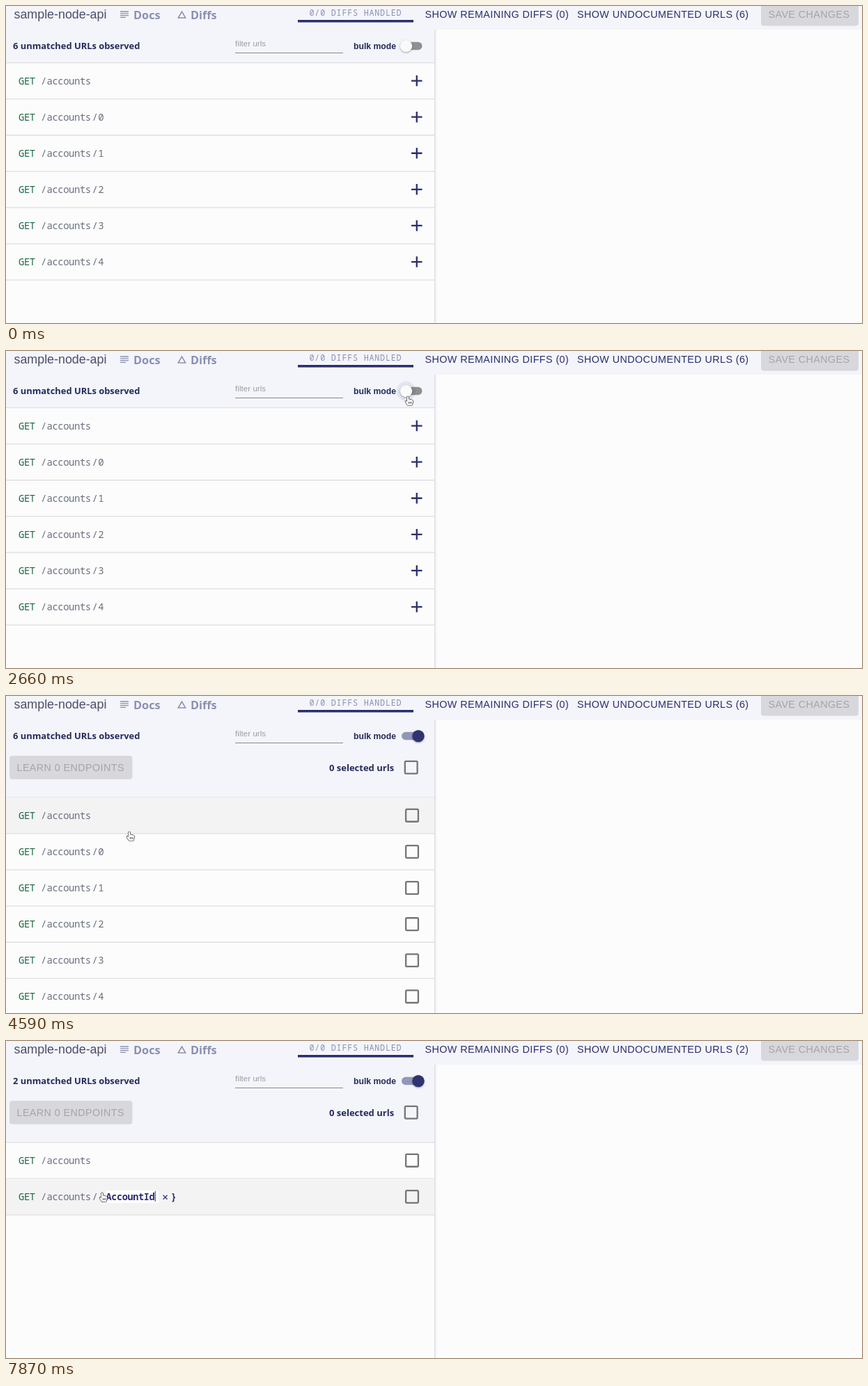
These frames come from a looping animation (1229x456 px, 8000 ms). An HTML page with a canvas:

```html
<!DOCTYPE html>
<html lang="en">
<head>
<meta charset="utf-8">
<title>URL list</title>
<style>
  html, body { margin: 0; width: 100%; height: 100%; overflow: hidden; background: #fcfcfc; }
  canvas { display: block; }
</style>
</head>
<body>
<canvas id="stage" width="1229" height="456"></canvas>
<script>
const ctx = document.getElementById('stage').getContext('2d');
const LOOP = 8000;
const NAVY = '#2b2e6e', INK = '#242a5e', LILAC = '#8b8fb3', PANEL = '#f4f5fa', PAPER = '#fcfcfc', LINE = '#dfdfe1';
const SANS = '"Liberation Sans", Arial, sans-serif';
const HUMAN = '"Noto Sans", sans-serif';
const MONO = '"Noto Sans Mono", monospace';
const ROW = 52.1, CHAR = 7.75;

// Times at which the layout changes
const PRESS = 2660, BULK = 2810, SWITCHED = 2960, NAMING = 5030, GROUPED = 5180;

// Pointer poses: time, tip x, tip y, shape, hovered row
const POINTER = [
  [900, 603, 409, 'arrow', -1], [1050, 602, 300, 'hand', 4], [1190, 599, 190, 'hand', 2], [1340, 596, 122, 'hand', 0],
  [1630, 586, 98, 'hand', 0], [1770, 578, 71, 'arrow', 0], [1920, 577, 67, 'hand', -1], [2360, 577, 65, 'hand', -1],
  [3850, 548, 76, 'arrow', -1], [4000, 462, 105, 'arrow', -1], [4150, 352, 140, 'arrow', -1], [4290, 262, 168, 'hand', 0],
  [4440, 206, 186, 'hand', 0], [4590, 177, 195, 'hand', 0], [4730, 150, 211, 'hand', 1], [4880, 138, 218, 'hand', 1],
];
// Typing: time, letters shown
const TYPING = [[6520, 1], [6670, 2], [6820, 3], [6970, 5], [7120, 6], [7270, 7], [7570, 8], [7870, 9]];

const SHAPES = {
  arrow: new Path2D('M0 0V10.6L2.5 8.4L4.2 12.2L6 11.4L4.4 7.7H7.7Z'),
  hand: new Path2D('M-1.4 1.2Q0 -.8 1.3 1.2V4.8Q2.5 3.8 3.5 5Q4.8 4.2 5.6 5.6Q7.2 5.4 7.2 7V9.3L5.8 13H-.4L-3.6 8.4Q-4 6.6 -2.6 7L-1.4 8Z'),
};

const latest = (list, t) => list.findLast(item => item[0] <= t);

function rect(x, y, w, h, color, radius = 0) {
  ctx.fillStyle = color;
  ctx.beginPath();
  ctx.roundRect(x, y, w, h, radius);
  ctx.fill();
}

function circle(x, y, r, color) {
  ctx.fillStyle = color;
  ctx.beginPath();
  ctx.arc(x, y, r, 0, 7);
  ctx.fill();
}

function stroke(path, color, width) {
  ctx.strokeStyle = color;
  ctx.lineWidth = width;
  ctx.stroke(new Path2D(path));
}

function text(string, x, y, font, color, spacing = 0) {
  ctx.font = font;
  ctx.letterSpacing = spacing + 'px';
  ctx.fillStyle = color;
  ctx.fillText(string, x, y);
}

const caps = (string, x, y, color) => text(string, x, y, '14.35px ' + SANS, color, 0.41);
const code = (string, x, y, color) => text(string, x, y, '14px ' + MONO, color, -0.5);
const boldCode = (string, x, y, color) => text(string, x, y, '700 13.5px ' + MONO, color, CHAR - 8.1);

function disabledButton(label, x, y, w, h, labelY) {
  rect(x, y, w, h, '#d8d8dc', 4);
  caps(label, x + 10.5, labelY, '#a5a5a9');
}

function checkbox(x, y) {
  ctx.strokeStyle = '#757577';
  ctx.lineWidth = 2.3;
  ctx.beginPath();
  ctx.roundRect(x - 8.9, y - 8.9, 17.8, 17.8, 1.5);
  ctx.stroke();
}

function drawTopBar(count) {
  rect(0, 0, 1229, 34, PANEL);
  text('sample-node-api', 11.5, 18, '17.85px ' + SANS, '#4a4e6b');
  stroke('M164 8H176M164 10.8H176M164 13.6H176M164 16.4H172', LILAC, 1.3);
  text('Docs', 183, 18.5, '600 16.3px ' + HUMAN, LILAC);
  stroke('M247.3 17L252.5 8L257.7 17Z', LILAC, 1.5);
  text('Diffs', 265, 18.5, '600 16.3px ' + HUMAN, LILAC);
  text('0/0 DIFFS HANDLED', 435.5, 14.3, '11.7px ' + MONO, LILAC, 0.8);
  rect(419, 20, 166, 3.5, NAVY);
  caps('SHOW REMAINING DIFFS (0)', 601.5, 17.3, NAVY);
  caps(`SHOW UNDOCUMENTED URLS (${count})`, 820, 17.3, NAVY);
  disabledButton('SAVE CHANGES', 1084, -6, 140, 34.5, 17.3);
}

function drawSwitch(t) {
  const on = t >= SWITCHED, x = on ? 592 : 574.5;
  rect(568, 51.8, 29.5, 11.5, on ? '#9396b8' : '#8f8f90', 5.8);
  if (t >= PRESS && t < 3110 && !(t >= BULK && t < SWITCHED)) circle(x, 57.8, 14, 'rgba(43,46,110,.08)');
  ctx.save();
  ctx.shadowColor = 'rgba(0,0,0,.35)';
  ctx.shadowBlur = 2.5;
  ctx.shadowOffsetY = 1;
  circle(x, 57.6, 8.7, t >= BULK ? '#2f3370' : '#fafafa');
  ctx.restore();
}

function drawPanelHead(t, count, bottom) {
  rect(0, 34, 615, bottom - 34, PANEL);
  text(count + ' unmatched URLs observed', 10, 62.3, '700 12.9px ' + HUMAN, INK);
  text('filter urls', 329, 58, '11.4px ' + SANS, '#9b9ba1', 0.1);
  rect(329, 67, 155, 1.1, '#88888d');
  text('bulk mode', 499, 62, '700 12.2px ' + SANS, INK);
  drawSwitch(t);
  if (t < BULK) return;
  disabledButton('LEARN 0 ENDPOINTS', 5, 86, 176.5, 33.7, 108.2);
  text('0 selected urls', 464, 107.8, '700 13px ' + HUMAN, INK);
  checkbox(581.7, 102.7);
}

function drawParameter(t, y) {
  const typed = 'AccountId'.slice(0, latest(TYPING, t)?.[1] ?? 0);
  const end = typed ? 149 + typed.length * CHAR : 309.5;
  rect(144, y - 9, end - 144, 18, '#fff');
  boldCode('{', 133.5, y + 5, NAVY);
  boldCode(typed || 'name path parameter', 143.6, y + 4.7, typed ? NAVY : '#6e6e70');
  stroke(`M${end + 6.8} ${y - 2.2}l6 6m0 -6l-6 6`, NAVY, 1.1);
  boldCode('}', end + 18, y + 5, NAVY);
  if (t < 5930 || t >= 6370) rect(144 + typed.length * CHAR, y - 8, 1, 15, NAVY);
}

function drawRow(t, index, top, hovered) {
  const y = top + ROW / 2;
  if (hovered) rect(0, top, 615, ROW, '#f3f3f3');
  code('GET', 18, y + 5, '#1f6a44');
  code('/', 50, y + 5, '#6a7080');
  code('accounts', 58.5, y + 5, '#6a7080');
  if (index) {
    code('/', 123.5, y + 5, '#6a7080');
    if (index === 1 && t >= NAMING) drawParameter(t, y);
    else code(String(index - 1), 132.3, y + 5, '#6a7080');
  }
  if (t >= BULK) {
    checkbox(583, y);
  } else {
    if (hovered && t >= 1630) circle(589.5, y, 16.5, '#e9e9ec');
    stroke(`M582 ${y}h15.5m-7.75 -7.75v15.5`, NAVY, 2.3);
  }
  rect(0, top + ROW - 0.6, 615, 1.3, LINE);
}

function drawPointer([, x, y, shape]) {
  ctx.save();
  ctx.translate(x, y);
  ctx.lineJoin = 'round';
  const hand = shape === 'hand';
  ctx.strokeStyle = hand ? '#111' : '#fff';
  ctx.fillStyle = hand ? '#fff' : '#000';
  ctx.lineWidth = hand ? 1.1 : 1.6;
  ctx.stroke(SHAPES[shape]);
  ctx.fill(SHAPES[shape]);
  if (hand) stroke('M1.3 8v2.8M3.2 8v2.8M5 8v2.8', '#111', 0.7);
  ctx.restore();
}

function draw(t) {
  const count = t < GROUPED ? 6 : 2;
  const top = t < BULK ? 81.5 : 145.8;
  const pointer = latest(POINTER, t);
  rect(0, 0, 1229, 456, PAPER);
  drawTopBar(count);
  drawPanelHead(t, count, top);
  rect(0, top - 0.6, 615, 1.3, LINE);
  for (let i = 0; i < count; i++) drawRow(t, i, top + i * ROW, pointer?.[4] === i);
  rect(615, 34, 3.5, 422, '#f4f4f8');
  rect(615, 34, 1.2, 422, '#dcdce2');
  if (pointer) drawPointer(pointer);
}

function tick() {
  draw(performance.now() % LOOP);
  requestAnimationFrame(tick);
}
tick();
</script>
</body>
</html>
```
